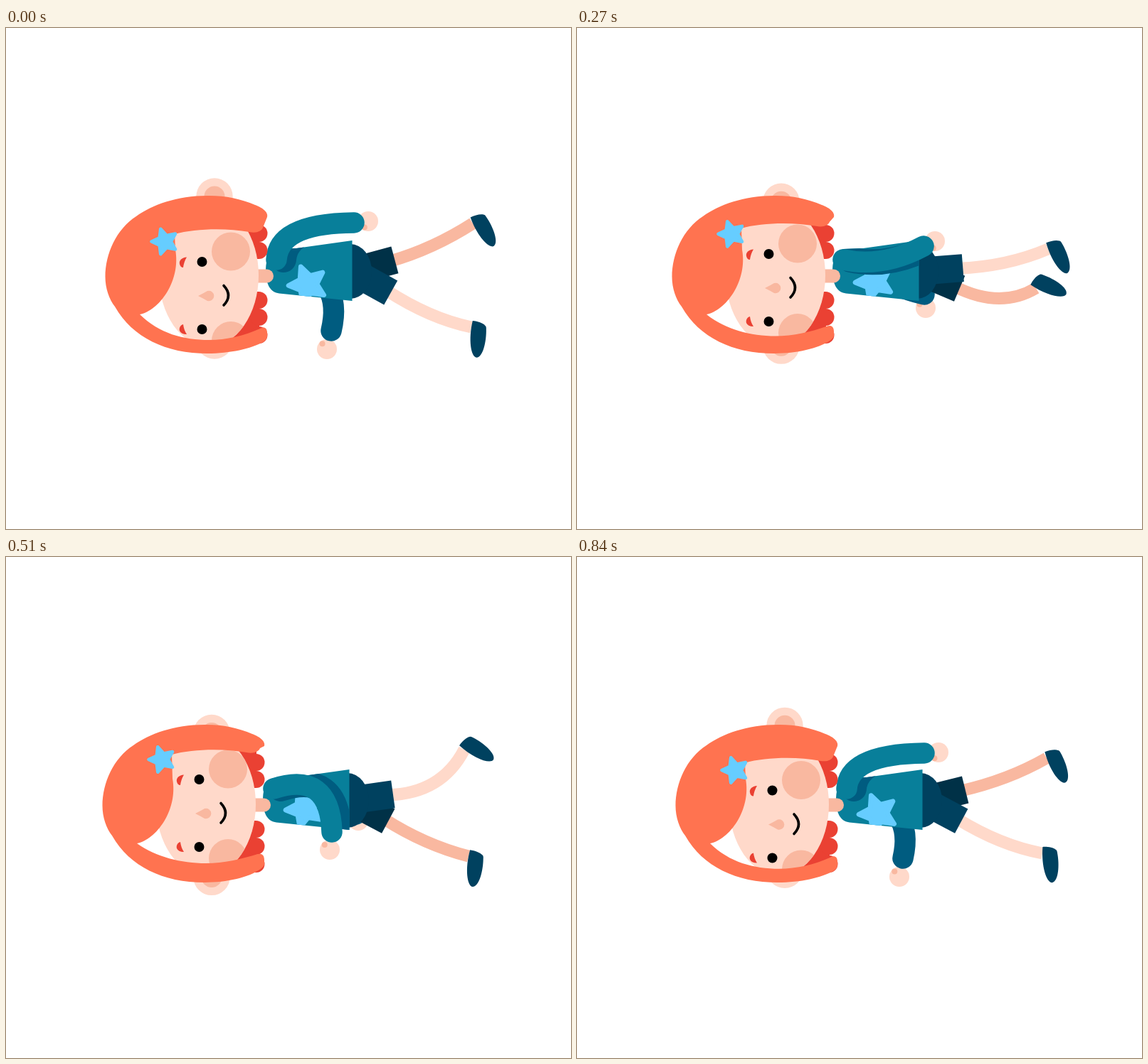
Recreate the animation shown at these times as an HTML page with a canvas. Size 794 by 705 pixels, loop 870 ms.

```html
<!DOCTYPE html>
<html lang="en">
<head>
<meta charset="utf-8">
<title>Walk cycle</title>
<style>
html, body { margin: 0; width: 100%; height: 100%; overflow: hidden; background: #fff; }
canvas { display: block; }
</style>
</head>
<body>
<canvas id="stage" width="794" height="705"></canvas>
<script>
const ctx = document.getElementById('stage').getContext('2d');
const LOOP = 870, STEP = 30, RAD = Math.PI / 180;
const SKIN = '#ffd9ca', BLUSH = '#f9b8a0', HAIR = '#ff7350', RED = '#ea4133',
  TEAL = '#087f9a', DEEP = '#005c80', SKY = '#66cdff', NAVY = '#00415f', NIGHT = '#003147';

// Pose tracks, one value per key time
const KEYS = [0, 120, 195, 270, 390, 510, 630, 705, 840];
const body = {
  dx: [0, -6.2, -9.6, -6, -1, -4, -9.8, -6.5, -1],
  dy: [0, -3, -7, -11, -16, -16, -10, -6, -0.5]
};
const nearLeg = {
  thigh: [29, 18.5, 6, -4.5, -20, -8, 15, 23, 28],
  kx: [596, 598, 601, 603, 608, 612, 620, 600, 595],
  ky: [409, 386, 362, 336, 309, 333, 376, 399, 406],
  ax: [654, 660, 663, 662, 660, 644, 625, 646, 654],
  ay: [421, 391, 352, 311, 267, 271, 295, 370, 417],
  foot: [95, 97, 84, 66, 54, 34, -33, 35, 86]
};
const farLeg = {
  thigh: [-15, 1, 13, 23, 32, 28, 11, -2, -14],
  kx: [600, 615, 615, 595, 588, 588, 599, 603, 606],
  ky: [311, 343, 378, 396, 412, 405, 379, 352, 314],
  ax: [656, 638, 628, 645, 645, 650, 660, 664, 660],
  ay: [275, 295, 322, 366, 430, 421, 378, 340, 283],
  foot: [62, 14, -15, 26, 92, 97, 85, 76, 67]
};
const nearArm = {
  ex: [383, 408, 418, 429, 445, 455, 436, 405, 382],
  ey: [275, 288, 312, 338, 320, 300, 272, 277, 277],
  wx: [489, 468, 480, 487, 453, 458, 478, 491, 488],
  wy: [274, 255, 280, 307, 397, 387, 347, 308, 276],
  hx: [509, 481, 492, 503, 448, 455, 490, 505, 508],
  hy: [272, 240, 266, 300, 421, 412, 363, 314, 275]
};
const farArm = {
  ex: [475, 465, 460, 445, 440, 450, 460, 465, 475],
  ey: [350, 345, 360, 365, 340, 350, 355, 355, 350],
  wx: [457, 467, 478, 488, 490, 492, 482, 470, 458],
  wy: [426, 411, 394, 375, 348, 362, 378, 398, 424],
  hx: [451, 469, 480, 490, 500, 495, 487, 473, 453],
  hy: [452, 436, 418, 394, 352, 371, 400, 421, 450]
};

// Smooth periodic curve through the key values
function sample(values, t) {
  const n = KEYS.length;
  const time = i => KEYS[(i + n) % n] + LOOP * Math.floor(i / n);
  const value = i => values[(i + n) % n];
  const slope = i => (value(i + 1) - value(i - 1)) / (time(i + 1) - time(i - 1));
  let i = n - 1;
  while (KEYS[i] > t) i--;
  const span = time(i + 1) - time(i), u = (t - time(i)) / span, w = 1 - u;
  return value(i) * w * w * (1 + 2 * u) + value(i + 1) * u * u * (3 - 2 * u)
    + span * u * w * (slope(i) * w - slope(i + 1) * u);
}
const pose = (tracks, t) =>
  Object.fromEntries(Object.entries(tracks).map(([name, values]) => [name, sample(values, t)]));

function fill(d, color) {
  ctx.fillStyle = color;
  ctx.fill(new Path2D(d));
}
function line(d, color, width, cap = 'round') {
  ctx.strokeStyle = color;
  ctx.lineWidth = width;
  ctx.lineCap = cap;
  ctx.stroke(new Path2D(d));
}
function oval(x, y, rx, color, ry = rx) {
  ctx.fillStyle = color;
  ctx.beginPath();
  ctx.ellipse(x, y, rx, ry, 0, 0, 7);
  ctx.fill();
}
function placed(x, y, angle, draw) {
  ctx.save();
  ctx.translate(x, y);
  ctx.rotate(angle * RAD);
  draw();
  ctx.restore();
}
function clipped(path, draw) {
  ctx.save();
  ctx.clip(path);
  draw();
  ctx.restore();
}
function star(x, y, r, angle) {
  let d = '';
  for (let i = 0; i < 10; i++) {
    const a = (angle + i * 36) * RAD, k = i % 2 ? r * 0.48 : r;
    d += (i ? 'L' : 'M') + (x + k * Math.cos(a)) + ' ' + (y + k * Math.sin(a));
  }
  ctx.lineJoin = 'round';
  fill(d + 'Z', SKY);
  line(d + 'Z', SKY, r * 0.25);
}

function drawLeg(leg, dx, skin, cloth) {
  const hipX = 486.5 + dx, hipY = 342.5, a = leg.thigh * RAD;
  const x = hipX + 55 * Math.cos(a), y = hipY + 55 * Math.sin(a);
  line(`M${x} ${y}Q${leg.kx} ${leg.ky} ${leg.ax} ${leg.ay}`, skin, 17, 'butt');
  placed(leg.ax, leg.ay, leg.foot, () =>
    fill('M-9-1C-9-8-7-16-4-19Q-3-21 1-21C18-23 41-20 42-11C42-3 18 3-9-1Z', NAVY));
  placed(hipX, hipY, leg.thigh, () => fill('M0-19.5H62V19.5H0Z', cloth));
}
function drawHand({ wx, wy, hx, hy }) {
  const len = Math.hypot(hx - wx, hy - wy), ux = (hx - wx) / len, uy = (hy - wy) / len;
  oval(hx, hy, 14, SKIN);
  oval(hx - 6 * ux - 8 * uy, hy - 6 * uy + 8 * ux, 4, BLUSH);
}
const sleeve = (arm, x, y) => `M${x} ${y}Q${arm.ex} ${arm.ey} ${arm.wx} ${arm.wy}`;

const TORSO = new Path2D('M486.5 299L408 310L380 311Q366 313 365 340C365 362 372 372 384 373.5L486.5 384Z');
function drawTorso(arm, dx, dy) {
  const armPath = sleeve(arm, 380 + dx, 326);
  ctx.save();
  ctx.translate(dx, 0);
  ctx.fillStyle = TEAL;
  ctx.fill(TORSO);
  clipped(TORSO, () => {
    star(424, 361 + dy * 0.4, 27, 177);
    ctx.translate(10 - dx, 0);
    line(armPath, DEEP, 36);
  });
  ctx.restore();
  drawHand(arm);
  line(armPath, TEAL, 29.5);
}

const FACE = new Path2D();
FACE.ellipse(285, 348, 70, 100, 0, 0, 7);
function drawFace(dy) {
  ctx.fillStyle = SKIN;
  ctx.fill(FACE);
  clipped(FACE, () => {
    ctx.translate(0, dy);
    oval(316, 314.5, 27, BLUSH);
    oval(316, 440, 27, BLUSH);
    for (const y of [329, 424]) oval(275.5, y, 7, '#000');
    fill('M254 322.5C247 323 243 327 244 332Q245 337 249 337Q250 329 254 322.5Z', RED);
    fill('M249 417C245 418 243 422 244 426Q246 431 254 431Q250 425 249 417Z', RED);
    fill('M270 377Q278 373 283 370A7.3 7.3 0 1 1 283 384Q278 381 270 377Z', BLUSH);
    line('M306 362.5Q319 376.5 306 390', '#000', 3.6);
  });
}
function drawHead(dx, dy) {
  const top = dy * 0.75, low = dy * 0.5, ear = -dy * 0.65;
  ctx.save();
  ctx.translate(dx, 0);
  for (const y of [237, 440]) {
    oval(293, y + ear, 25.7, SKIN);
    oval(293, y + ear, 14.5, BLUSH);
  }
  fill('M310 265H356V325H310ZM310 371H356V440H310Z', RED);
  for (const y of [289, 313, 383, 407, 432]) oval(355.5, y, 12, RED);
  fill('M340 339.5H366.5A9.5 9.5 0 0 1 366.5 358.5H340Z', BLUSH);
  drawFace(dy);
  fill(`M188 403C215 398 246 356 238 312L237 ${290 + top}
    C265 ${282 + top} 310 ${281 + top} 342 ${287 + top}
    C352 ${289 + top} 359 ${286 + top} 361 ${281 + top}L367 266
    C369 258 358 252 350 249C330 240 305 235.5 283 236C240 236 205 249 183 265
    C155 283 139.5 318 139.5 350C139.5 366 145 382 153 392C178 436 225 458 283 458
    C315 458 345 451 361 ${442 + low * 0.3}C368 ${438 + low * 0.5} 367 434 367 ${429 + low * 0.3}
    C367 ${421 + low * 0.4} 362 ${420 + low * 0.4} 357 ${423 + low * 0.6}
    C335 ${433 + low} 310 ${439 + low} 285 ${439 + low}C250 ${439 + low} 215 ${430 + low} 188 403Z`, HAIR);
  star(223, 300.5 + dy * 0.97, 18.5, 180);
  ctx.restore();
}

function draw(t) {
  const { dx, dy } = pose(body, t), back = pose(farArm, t);
  ctx.fillStyle = '#fff';
  ctx.fillRect(0, 0, 794, 705);
  drawHand(back);
  line(sleeve(back, 400 + dx, 335), DEEP, 29.5);
  drawLeg(pose(farLeg, t), dx, BLUSH, NIGHT);
  drawLeg(pose(nearLeg, t), dx, SKIN, NAVY);
  oval(484 + dx, 342.5, 30, NAVY, 38.5);
  drawTorso(pose(nearArm, t), dx, dy);
  drawHead(dx, dy);
}
function tick() {
  draw(Math.floor(performance.now() % LOOP / STEP) * STEP);
  requestAnimationFrame(tick);
}
tick();
</script>
</body>
</html>
```
